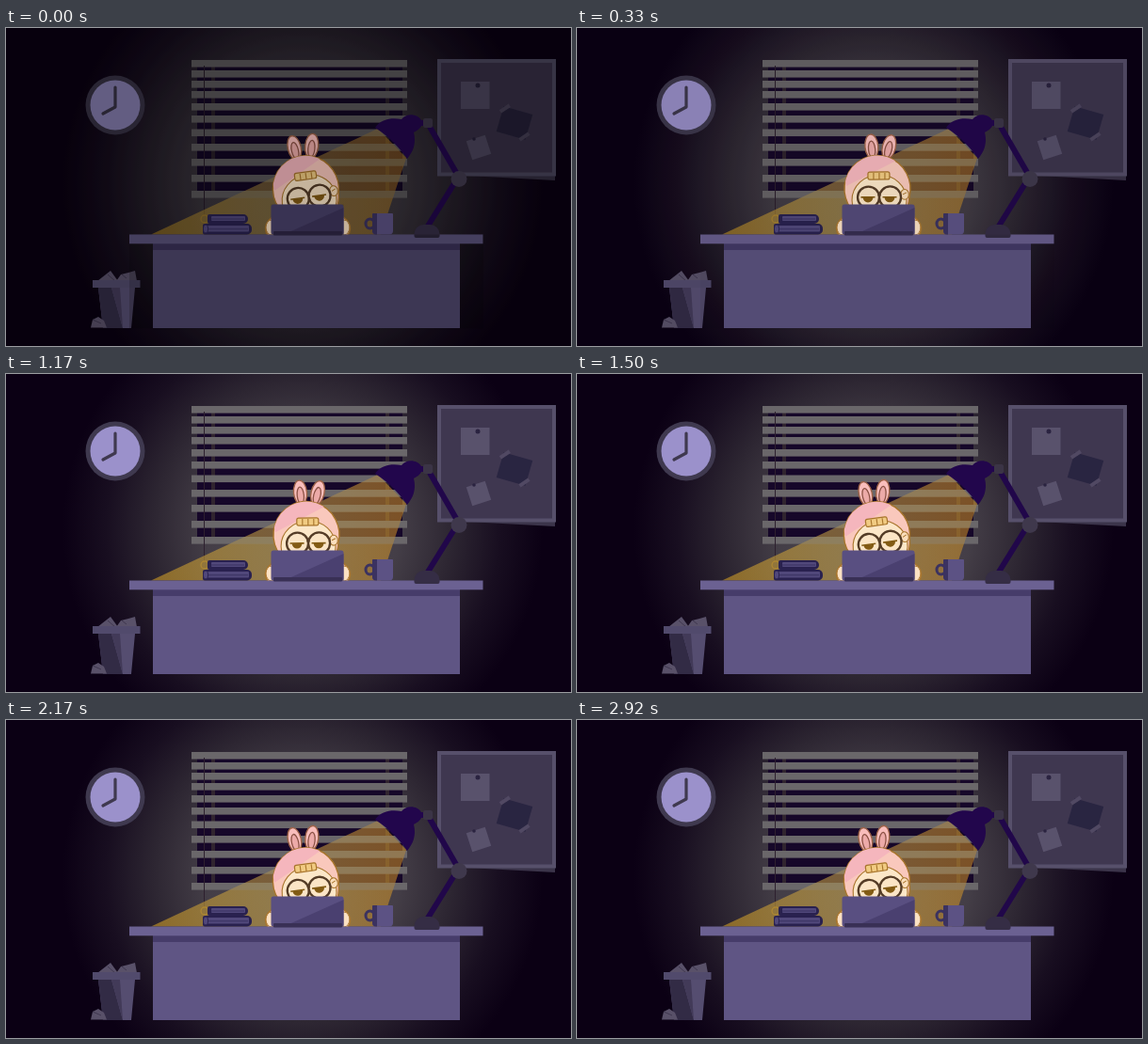
Write an HTML page with a canvas that moves like this. It is 600 px wide and 338 px high and loops after 3010 ms.

```html
<!DOCTYPE html>
<html lang="en">
<head>
<meta charset="utf-8">
<title>Late night at the desk</title>
<style>
html, body { margin: 0; width: 100%; height: 100%; overflow: hidden; background: #0b0014; }
canvas { display: block; width: 600px; height: 338px; }
</style>
</head>
<body>
<canvas id="stage"></canvas>
<script>
const W = 600, H = 338, LOOP = 3010, STEP = 1000 / 12, SWAY = 735;
const canvas = document.getElementById('stage');
const ratio = window.devicePixelRatio || 1;
canvas.width = W * ratio;
canvas.height = H * ratio;
const ctx = canvas.getContext('2d');
const OUTLINE = '#a8752c';

function paint(fill, stroke, width = 1.2) {
  if (fill) { ctx.fillStyle = fill; ctx.fill(); }
  if (stroke) { ctx.strokeStyle = stroke; ctx.lineWidth = width; ctx.stroke(); }
}

function box(x, y, w, h, fill) {
  ctx.fillStyle = fill;
  ctx.fillRect(x, y, w, h);
}

function round(x, y, w, h, radii, fill, stroke, width) {
  ctx.beginPath();
  ctx.roundRect(x, y, w, h, radii);
  paint(fill, stroke, width);
}

function poly(points, fill, stroke, width) {
  ctx.beginPath();
  for (const [x, y] of points) ctx.lineTo(x, y);
  ctx.closePath();
  paint(fill, stroke, width);
}

function oval(x, y, rx, ry, fill, stroke, width, angle = 0) {
  ctx.beginPath();
  ctx.ellipse(x, y, rx, ry, angle, 0, 2 * Math.PI);
  paint(fill, stroke, width);
}

function line(x1, y1, x2, y2, color, width, cap = 'butt') {
  ctx.beginPath();
  ctx.moveTo(x1, y1);
  ctx.lineTo(x2, y2);
  ctx.lineCap = cap;
  paint(null, color, width);
}

function turned(x, y, degrees, draw) {
  ctx.save();
  ctx.translate(x, y);
  ctx.rotate(degrees * Math.PI / 180);
  draw();
  ctx.restore();
}

function gradient(g, stops) {
  stops.forEach(([at, color]) => g.addColorStop(at, color));
  return g;
}

function wall() {
  box(0, 0, W, H, '#0b0014');
  box(0, 0, W, H, gradient(ctx.createRadialGradient(315, 165, 0, 315, 165, 255), [
    [0, '#4d474f'], [.4, '#443e47'], [.62, '#2d2632'], [.82, '#180e20'], [1, '#0b0014']
  ]));
}

function slats(alpha) {
  ctx.globalAlpha = alpha;
  for (const y of [34, 45, 56, 67, 80, 93, 107.5, 123, 139, 156, 173]) box(197, y, 229, 7.6, '#6a676a');
  ctx.globalAlpha = 1;
}

function windowBlind() {
  box(203, 36, 218, 140, '#160729');
  box(218, 36, 4, 140, '#30242f');
  box(403, 36, 4, 140, '#30242f');
  slats(1);
  line(210.5, 40, 210.5, 200, '#2d202e', 1);
  oval(211, 203, 4, 4, null, '#81632d', 1.3);
}

function beam() {
  poly([[395, 107], [154, 219.5], [398, 219.5], [425, 138]],
    gradient(ctx.createLinearGradient(154, 0, 425, 0), [
      [0, 'rgba(206,155,36,.6)'], [.5, 'rgba(208,172,78,.53)'], [1, 'rgba(218,150,36,.52)']
    ]));
  ctx.save();
  ctx.clip();
  slats(.35);
  ctx.restore();
}

function clock() {
  oval(116, 82, 31.5, 31.5, '#3f394f');
  oval(116, 82, 26.5, 26.5, '#9b91cb');
  ctx.beginPath();
  ctx.moveTo(116, 63);
  ctx.lineTo(116, 84);
  ctx.lineTo(103, 91);
  ctx.lineCap = ctx.lineJoin = 'round';
  paint(null, '#3f394f', 3.2);
}

function board() {
  poly([[490, 157], [583, 156], [583, 162]], '#3b344a');
  box(458, 33, 126, 124.5, '#57506b');
  box(462, 37, 118, 116.5, '#3f3750');
  box(483, 57, 30.5, 29, '#59526c');
  oval(501, 61, 2.5, 2.5, '#2a2340');
  turned(540, 101, 16, () => {
    box(-16, -14, 32, 28, '#292541');
    turned(-14, -12, -50, () => box(-6, -2, 12, 4, '#514963'));
    turned(14, 11, -50, () => box(-6, -2, 12, 4, '#514963'));
  });
  turned(502, 127, -18, () => box(-10.5, -10.5, 21, 21, '#59526c'));
  oval(497, 118, 1.8, 1.8, '#2a2340');
}

function lamp() {
  line(450, 105, 480, 157, '#21074a', 6);
  line(478, 162, 447, 212, '#21074a', 6);
  round(433.5, 209, 27, 14, [10, 10, 2, 2], '#352d45');
  oval(481, 160.5, 8.5, 8.5, '#3f384c');
  ctx.beginPath();
  ctx.moveTo(392, 106);
  ctx.bezierCurveTo(398, 96, 411, 95, 420, 97);
  ctx.bezierCurveTo(425, 90, 437, 91, 441, 98);
  ctx.quadraticCurveTo(444, 106, 433, 111);
  ctx.bezierCurveTo(436, 123, 432, 132, 426, 139);
  ctx.bezierCurveTo(420, 130, 407, 115, 392, 106);
  paint('#22064c');
  line(436, 101, 446, 101, '#22064c', 6);
  round(443, 96, 10, 10, 2, '#3b3446');
}

function desk() {
  box(156, 229, 326, 90, '#5f5584');
  box(156, 229, 326, 7, '#463c6a');
  box(131, 219.5, 375.5, 9.8, '#6b6192');
}

function books() {
  const book = (x, y, w, h) => {
    round(x, y, w, h, [2, 5, 5, 2], '#29214f');
    round(x + 4, y + 2, w - 7, h - 5, 1, '#51487b');
    line(x + 4, y + h / 2, x + w - 4, y + h / 2, '#393060', 1);
  };
  book(214, 198, 43, 10);
  book(209, 208, 52, 11.5);
  oval(212, 213.5, 2.5, 4.5, '#51487b', '#29214f', 1);
}

function mug() {
  oval(386.5, 208, 4.5, 5, null, '#3b3260', 3);
  round(389, 197, 22, 22.5, [1, 1, 4, 4], '#5c5284');
  round(389, 197, 5, 22.5, [1, 0, 0, 4], '#3b3260');
}

function bin() {
  poly([[97, 269], [111, 258], [119, 269]], '#595169');
  poly([[117, 269], [122, 262], [130, 260], [137, 258], [139, 269]], '#595169');
  line(108, 262, 116, 269, '#403850', 1);
  line(123, 262, 128, 266, '#403850', 1);
  poly([[98, 276], [137, 276], [133, 319], [103, 319]], '#554d70');
  poly([[98, 276], [112, 276], [124, 319], [103, 319]], '#322b45');
  poly([[112, 276], [121, 276], [124, 319]], '#423a58');
  box(92, 268, 50.5, 8, '#514a6c');
  poly([[90, 318.5], [92, 310], [98, 307], [104, 311], [107, 318.5]], '#595169');
  line(92, 310, 101, 314, '#403850', 1);
}

function bunnyEar(x, y, degrees) {
  turned(x, y, degrees, () => {
    oval(0, 0, 7, 13, '#f8bdbb', '#9c6248', 1.4);
    oval(0, 3, 3.6, 9, '#ecaaa8', '#8b5145', 1.3);
  });
}

function eye(x) {
  oval(x, 180, 11.5, 11.5, '#fbe5c6', '#543c26', 2.3);
  ctx.beginPath();
  ctx.arc(x - .5, 180, 5.4, 0, Math.PI);
  paint('#825b14');
  line(x - 8, 179.8, x + 7, 179.8, '#825b14', 1.6);
}

function head() {
  bunnyEar(313, 126, -5);
  bunnyEar(331.5, 126.5, 14);
  oval(348, 176, 5.5, 6.5, '#fbdfbd', OUTLINE, 1.3);
  ctx.beginPath();
  ctx.ellipse(319, 171, 35, 35.5, 0, Math.PI * .85, Math.PI * 2.08);
  ctx.quadraticCurveTo(352, 200, 333, 207);
  ctx.lineTo(300, 207);
  ctx.closePath();
  paint('#f9c8bc', OUTLINE, 1.4);
  ctx.save();
  ctx.clip();
  poly([[280, 134], [330, 134], [341, 140], [286, 168]], '#f5b6bd');
  ctx.restore();
  oval(321, 183, 29, 27, '#fce7c8', OUTLINE, 1.1);
  oval(348, 177, 4.3, 5.4, '#fbdfbd', OUTLINE, 1.1);
  line(346, 177, 350, 175, OUTLINE, 1);
  round(309, 153, 23, 8, 2, '#f1cb82', OUTLINE, 1.2);
  for (const x of [315, 321, 327]) line(x, 154, x, 161, OUTLINE, 1.1);
  eye(309.5);
  eye(332.5);
  line(319.5, 177.5, 322.5, 177.5, '#543c26', 2);
}

function person(tilt) {
  oval(320.5, 213, 45, 22, '#f8ccba', OUTLINE, 1.4);
  oval(282, 212, 6, 8, '#fbe1c3', OUTLINE, 1);
  oval(359, 212, 6, 8, '#fbe1c3', OUTLINE, 1);
  ctx.save();
  ctx.translate(320, 175);
  ctx.rotate(tilt);
  ctx.translate(-320, -175);
  head();
  ctx.restore();
}

function laptop() {
  round(281.5, 187.5, 77, 32, 2.5, '#594f81');
  poly([[295, 219.5], [358.5, 191], [358.5, 219.5]], '#4a4070');
  round(284, 216, 73, 4.5, 1, '#393055');
}

function draw(now) {
  const step = Math.min(35, Math.floor((now % LOOP + 3.4) / STEP));
  const time = step * STEP;
  const dark = Math.pow(Math.max(0, 1 - step / 7), 1.5);
  const tilt = -8 * (.5 + .5 * Math.cos(2 * Math.PI * time / SWAY)) * Math.PI / 180;
  const backShade = `rgba(0,0,0,${.18 * dark})`;

  ctx.setTransform(ratio, 0, 0, ratio, 0, 0);
  wall();
  windowBlind();
  beam();
  clock();
  board();
  box(0, 0, W, H, backShade);
  person(tilt);
  desk();
  lamp();
  books();
  mug();
  bin();
  laptop();
  // The figure stays brighter than the furniture while the room fades in.
  box(131, 219.5, 376, 100, backShade);
  box(281.5, 187.5, 77, 32, backShade);
  box(0, 0, W, H, `rgba(0,0,0,${.22 * dark})`);
}

const start = performance.now();
function tick() {
  draw(performance.now() - start);
  requestAnimationFrame(tick);
}
tick();
</script>
</body>
</html>
```
